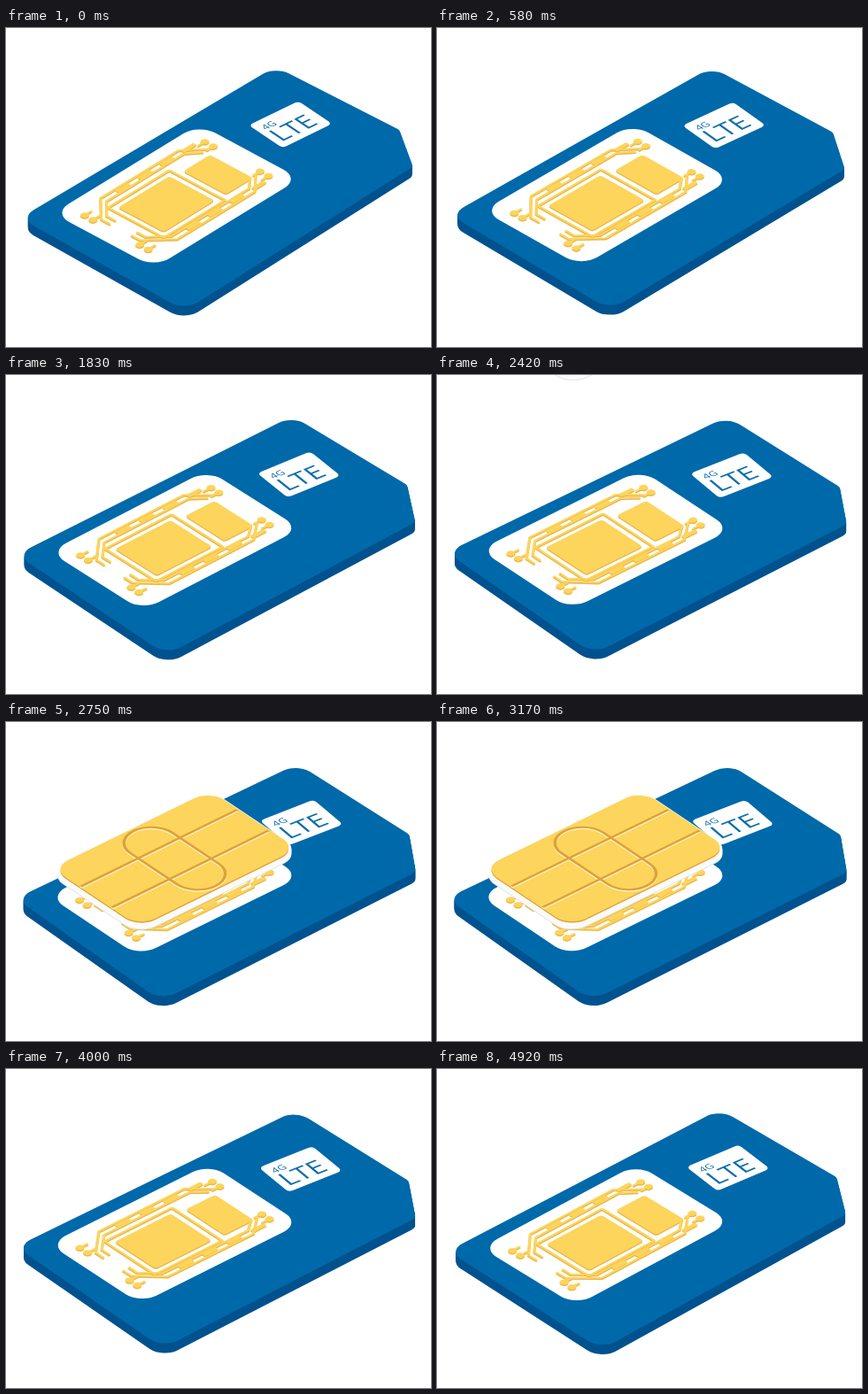
Animation of 480x360 px, one loop 5 s. Source, as an HTML page with a canvas:

```html
<!DOCTYPE html>
<html lang="en">
<head>
<meta charset="utf-8">
<title>SIM card</title>
<style>
html, body { margin: 0; width: 100%; height: 100%; overflow: hidden; background: #fff; }
canvas { display: block; }
</style>
</head>
<body>
<canvas id="stage" width="480" height="360"></canvas>
<script>
const ctx = document.getElementById('stage').getContext('2d');
const LOOP = 5000, STEP = LOOP / 60, TURN = 3165;
const TILT = 0.572, DEPTH = 6000, THICKNESS = 11;
const BLUE = '#0069aa', NAVY = '#00528f', GOLD = '#fdd45c', AMBER = '#dca23a';
let cos, sin;

// Perspective: points nearer the viewer grow.
const nearness = (x, y) => 1 / (1 - (y * cos - x * sin) / DEPTH);

// Draw in the card plane: x runs along the long side, y along the short one.
function onPlane(lift, draw, x = 0, y = 0, turn = 0) {
  const scale = nearness(x, y);
  ctx.save();
  ctx.transform(cos, -TILT * sin, sin, TILT * cos, 255, 175.7 - lift);
  ctx.scale(scale, scale);
  ctx.translate(x, y);
  ctx.rotate(turn);
  draw();
  ctx.restore();
}

function fillBox(x, y, w, h, r, color) {
  ctx.beginPath();
  ctx.roundRect(x, y, w, h, r);
  ctx.fillStyle = color;
  ctx.fill();
}

const fillCentered = (w, h, r, color) => fillBox(-w / 2, -h / 2, w, h, r, color);

function strokePath(points, color) {
  ctx.beginPath();
  points.forEach(([x, y]) => ctx.lineTo(x, y));
  ctx.lineWidth = 3;
  ctx.strokeStyle = color;
  ctx.stroke();
}

function fillCard(color) {
  const w = 210.5, h = 127;
  const corners = [[-w, -h, 22], [w, -h, 22], [w, h - 60, 10], [w - 45, h, 12], [-w, h, 22]]
    .map(([x, y, r]) => [x * nearness(x, y), y * nearness(x, y), r]);
  const [[x0, y0], [x1, y1]] = corners;
  ctx.beginPath();
  ctx.moveTo((x0 + x1) / 2, (y0 + y1) / 2);
  corners.forEach((_, i) => {
    const [x, y, r] = corners[(i + 1) % 5], [nextX, nextY] = corners[(i + 2) % 5];
    ctx.arcTo(x, y, nextX, nextY, r);
  });
  ctx.closePath();
  ctx.fillStyle = color;
  ctx.fill();
}

function drawTag() {
  fillCentered(75, 60, 6, '#fff');
  ctx.fillStyle = '#0b6dab';
  ctx.font = '14px "Open Sans", sans-serif';
  ctx.fillText('4G', -29, -10);
  ctx.font = '36px "Open Sans", sans-serif';
  ctx.fillText('LTE', -31, 20);
}

function drawCircuit(color) {
  ctx.lineJoin = 'round';
  fillBox(-62, -32, 84, 70, 4, color);
  fillBox(40, -27, 44, 66, 4, color);
  strokePath([[31, -40], [31, 46], [-70, 46], [-70, -40], [31, -40]], color);

  for (const side of [-1, 1]) {
    // Nested traces along the long sides, bending inward at their ends.
    for (const inset of [0, 9]) {
      const y = side * (59 - inset), end = 92 - inset;
      strokePath([[-end, side * 16], [-end, side * 30], [-62, y], [66, y], [end, side * 36]], color);
    }
    for (let x = -40; x < 80; x += 36) fillBox(x, side * 54 - 3, 20, 6, 1, color);
    for (const edge of [-1, 1]) for (const y of [36, 49]) {
      ctx.beginPath();
      ctx.arc(edge * 99, side * y, 5, 0, 7);
      ctx.fill();
      strokePath([[edge * 99, side * y], [edge * 87, side * y]], color);
    }
  }
}

function drawGrooves(color) {
  ctx.beginPath();
  ctx.roundRect(-31, -71, 62, 142, 31);
  for (const y of [-27, 27]) {
    ctx.moveTo(-116, y);
    ctx.lineTo(116, y);
  }
  ctx.strokeStyle = color;
  ctx.lineWidth = 3.5;
  ctx.stroke();
}

function drawModule(lift) {
  const layer = (dz, draw) => onPlane(lift + dz, draw, -60, -29);
  layer(0, () => fillCentered(240, 156, 25, '#dfe4e6'));
  for (let z = 1; z < 7; z++) layer(z, () => fillCentered(240, 156, 25, '#fbfbfb'));
  layer(6, () => fillCentered(235, 151, 24, AMBER));
  layer(7.5, () => fillCentered(235, 151, 24, GOLD));
  layer(6, () => drawGrooves('#fff0bd'));
  layer(7.5, () => drawGrooves(AMBER));
}

function smooth(from, to, value) {
  const x = Math.min(1, Math.max(0, (value - from) / (to - from)));
  return x * x * (3 - 2 * x);
}

// The motion plays forward up to TURN and then runs back.
function draw(t) {
  const distance = Math.abs(t - TURN);
  const angle = (40.5 + 4 * (1 - Math.cos(0.0007 * distance))) * Math.PI / 180;
  cos = Math.cos(angle);
  sin = Math.sin(angle);
  ctx.fillStyle = '#fff';
  ctx.fillRect(0, 0, 480, 360);

  for (let z = -THICKNESS; z < 0; z++) onPlane(z, () => fillCard(NAVY));
  onPlane(0, () => fillCard(BLUE));
  onPlane(0, drawTag, 133, -32, 0.113);
  onPlane(0, () => fillCentered(240, 156, 25, '#fff'), -60, -29);
  onPlane(-1, () => drawCircuit('#e9b74a'), -60, -29);
  onPlane(0.5, () => drawCircuit(GOLD), -60, -29);

  const away = smooth(420, 810, distance);
  if (away < 1) drawModule(24 + 245 * away);
}

function frame(now) {
  draw(Math.floor((now % LOOP + 4) / STEP) % 60 * STEP);
  requestAnimationFrame(frame);
}
requestAnimationFrame(frame);
</script>
</body>
</html>
```
